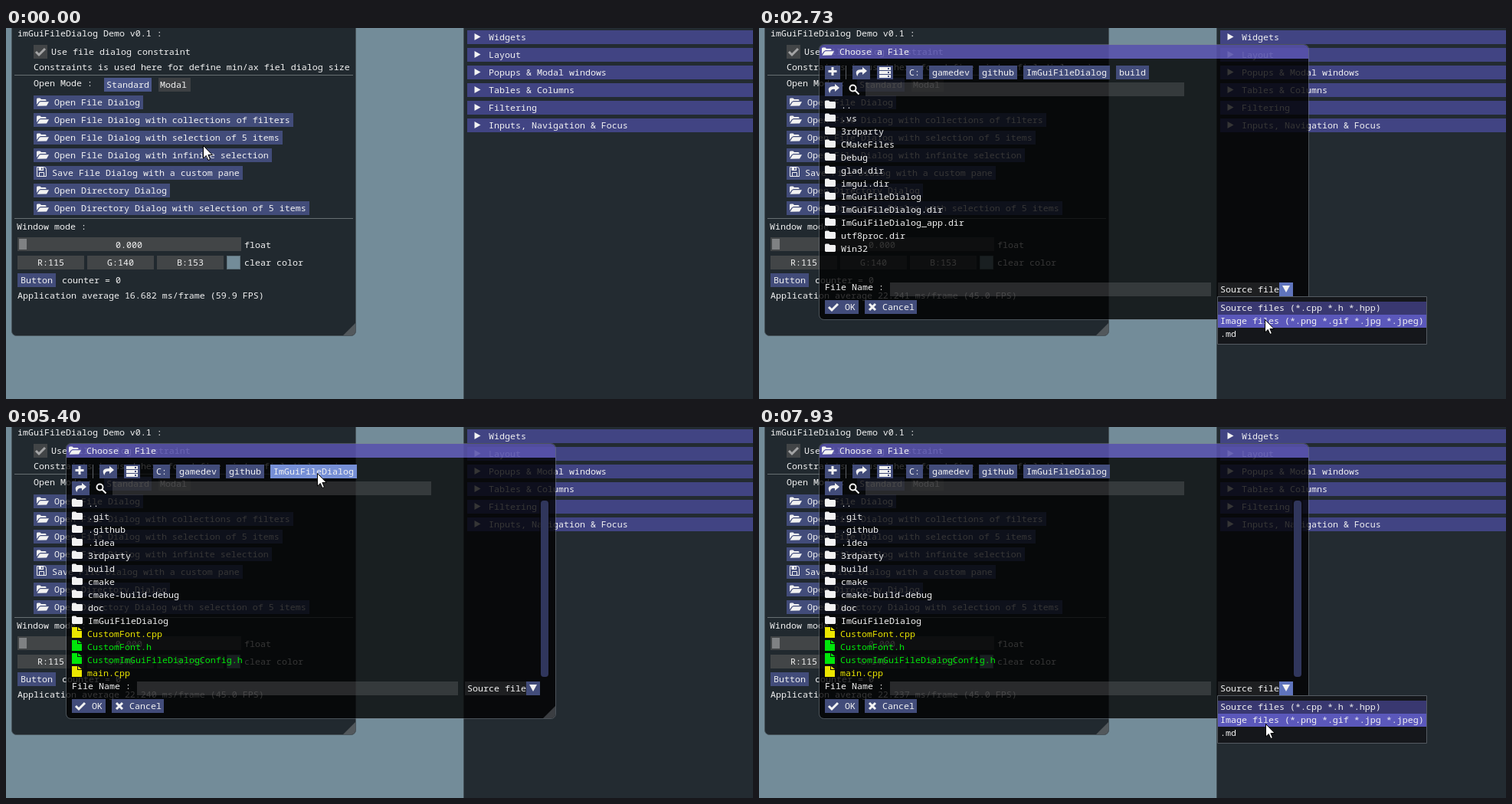
These frames come from a looping animation (975x484 px, 8 s). An HTML page with a canvas:

```html
<!DOCTYPE html>
<html lang="en">
<head>
<meta charset="utf-8">
<title>File dialog demo</title>
<style>
html, body { margin: 0; width: 100%; height: 100%; overflow: hidden; background: #738c99; }
canvas { display: block; }
</style>
</head>
<body>
<canvas id="stage" width="975" height="484"></canvas>
<script>
const ctx = document.getElementById('stage').getContext('2d');
const LOOP = 8000, STEP = 1000 / 15;
const ROW = 23, LINE = 17, CHAR = 7, FRAME_H = 18;
const BUTTON = '#424c7a', HOVER = '#768fd6', TEXT = '#f2f2f2', FRAME = '#424547';
const DARK_FRAME = 'rgba(120,120,122,.3)', SELECT = '#5b58bb', CLEAR = '#738c99';

// stops of the pointer: time, x, y
const STOPS = [
  [0, 257, 153], [500, 414, 130], [1130, 352, 117], [1350, 352, 117], [1867, 639, 333],
  [2900, 662, 383], [3300, 662, 383], [3533, 628, 348], [3700, 645, 342], [4467, 650, 364],
  [4600, 527, 163], [5050, 408, 58], [5560, 406, 60], [6200, 441, 236], [6267, 447, 282],
  [7000, 660, 342], [7860, 661, 387]
];
const ACTIONS = [
  'Open File Dialog', 'Open File Dialog with collections of filters',
  'Open File Dialog with selection of 5 items', 'Open File Dialog with infinite selection',
  'Save File Dialog with a custom pane', 'Open Directory Dialog',
  'Open Directory Dialog with selection of 5 items'
];
const HEADERS = ['Widgets', 'Layout', 'Popups & Modal windows', 'Tables & Columns',
  'Filtering', 'Inputs, Navigation & Focus'];
const BUILD_DIR = ['..', '.vs', '3rdparty', 'CMakeFiles', 'Debug', 'glad.dir', 'imgui.dir',
  'ImGuiFileDialog', 'ImGuiFileDialog.dir', 'ImGuiFileDialog_app.dir', 'utf8proc.dir', 'Win32'];
const ROOT_DIR = ['..', '.git', '.github', '.idea', '3rdparty', 'build', 'cmake',
  'cmake-build-debug', 'doc', 'ImGuiFileDialog', 'CustomFont.cpp', 'CustomFont.h',
  'CustomImGuiFileDialogConfig.h', 'main.cpp'];
const FILTERS = ['Source files (*.cpp *.h *.hpp)', 'Image files (*.png *.gif *.jpg *.jpeg)', '.md'];
const CRUMBS = ['C:', 'gamedev', 'github', 'ImGuiFileDialog', 'build'];

const FILLED = {
  open: 'M0 9V1.5L1 .5H4.5L6 2H11.5L12.5 3V4H5L2.8 5.2ZM.6 10.7L3.6 6L5 5.2H16L13 10.5Z',
  folder: 'M0 1.5L1 .5H5L6.5 2H13L14 3V10L13 11H1L0 10Z',
  file: 'M0 0H7V5H13V14H0ZM8 0L13 4H8Z',
  share: 'M9 0L15 5L9 10V7Q3.5 6 2.4 12Q-3 3 9 3Z',
  down: 'M0 0H10L5 9Z',
  right: 'M0 0L8 4.5L0 9Z',
  arrow: 'M0 0V16.5L3.8 13L6.4 19L9 17.9L6.4 12H11.7Z'
};
const STROKED = {
  check: 'M1 5L5 9L13 1',
  cross: 'M1 1L9 9M9 1L1 9',
  plus: 'M5.5 0V11M0 5.5H11',
  lens: 'M8 4A4 4 0 1 0 0 4A4 4 0 1 0 8 4M7 7L12 12'
};

function icon(name, x, y, color = TEXT, weight = 3) {
  const solid = name in FILLED, path = new Path2D((solid ? FILLED : STROKED)[name]);
  ctx.save();
  ctx.translate(x, y);
  ctx.fillStyle = ctx.strokeStyle = color;
  ctx.lineWidth = weight;
  if (solid) ctx.fill(path); else ctx.stroke(path);
  ctx.restore();
}
function rect(x, y, w, h, color) {
  ctx.fillStyle = color;
  ctx.fillRect(x, y, w, h);
}
// c is the vertical centre of a line of text
function text(s, x, c, color = TEXT) {
  ctx.fillStyle = color;
  ctx.fillText(s, x, c + 4);
}
function frame(x, c, w, color = FRAME) {
  rect(x, c - 9, w, FRAME_H, color);
}
function panel(x, y, w, h, radii, fill, stroke) {
  ctx.beginPath();
  ctx.roundRect(x, y, w, h, radii);
  if (fill) { ctx.fillStyle = fill; ctx.fill(); }
  if (stroke) { ctx.strokeStyle = stroke; ctx.lineWidth = 1; ctx.stroke(); }
}
function grip(x, y, color) {
  ctx.fillStyle = color;
  ctx.beginPath();
  ctx.moveTo(x, y - 16);
  ctx.arcTo(x, y, x - 16, y, 5);
  ctx.lineTo(x - 16, y);
  ctx.fill();
}
const within = (p, x, y, w, h) => p && p[0] >= x && p[0] < x + w && p[1] >= y && p[1] < y + h;

function button(x, c, w, mouse, color = BUTTON) {
  frame(x, c, w, within(mouse, x, c - 9, w, FRAME_H) ? HOVER : color);
}

function pointerAt(t) {
  const next = STOPS.findIndex(s => s[0] > t);
  if (next < 0) return STOPS[STOPS.length - 1].slice(1);
  const [t0, x0, y0] = STOPS[next - 1], [t1, x1, y1] = STOPS[next];
  const u = (t - t0) / (t1 - t0), ease = u * u * (3 - 2 * u);
  return [x0 + (x1 - x0) * ease, y0 + (y1 - y0) * ease];
}

// climbs steadily, then wavers around 22.24
function averageAt(t) {
  const settled = 22.237 + .004 * Math.abs(Math.sin(Math.PI * (t - 4600) / 3333));
  return Math.min(16.682 + t * .002086, settled);
}

function floppy(x, y) {
  panel(x, y, 12, 12, [0, 3, 0, 0], null, TEXT);
  panel(x + 3, y + 7, 6, 5, 0, null, TEXT);
  rect(x + 2, y, 6.5, 4.5, TEXT);
  rect(x + 5.5, y + 1, 1.6, 2.5, BUTTON);
}

function stack(x, y) {
  for (let i = 0; i < 3; i++) {
    rect(x, y + 5 * i, 15, 4, TEXT);
    rect(x + 11, y + 5 * i + 1, 2, 2, BUTTON);
  }
}

function drawMain(t, mouse) {
  panel(7.5, -20.5, 449, 422, 6, '#21292f', '#48545b');
  grip(456, 401, '#52585c');
  text('imGuiFileDialog Demo v0.1 :', 15, 7);
  frame(36, 31, 18);
  icon('check', 38, 26, '#a3a4a5');
  text('Use file dialog constraint', 59, 31);
  text('Constraints is used here for define min/ax fiel dialog size', 36, 51);
  rect(11, 61, 442, 1, '#666e72');
  text('Open Mode :', 36, 72);
  button(128, 74, 62, null, '#4a5689');
  text('Standard', 131, 74);
  button(199, 74, 42, null, '#3d4043');
  text('Modal', 201, 74);
  ACTIONS.forEach((label, i) => {
    const c = 97 + ROW * i, save = label.startsWith('Save'), x = save ? 60 : 63;
    button(36, c, x - 32 + label.length * CHAR, mouse);
    if (save) floppy(40.5, c - 7.5);
    else icon('open', 40, c - 6);
    text(label, x, c);
  });
  rect(11, 248, 442, 1, '#666e72');
  text('Window mode :', 14, 259);
  frame(15, 282, 292);
  rect(17, 275, 10, 14, '#7f8183');
  text('0.000', 143, 283);
  text('float', 311, 283);
  ['R:115', 'G:140', 'B:153'].forEach((label, i) => {
    frame(15 + 91 * i, 306, 87);
    text(label, 41 + 91 * i, 306);
  });
  frame(288, 306, 18, '#5d7079');
  rect(289, 298, 16, 16, CLEAR);
  text('clear color', 311, 306);
  button(15, 329, 50);
  text('Button', 19, 329);
  text('counter = 0', 73, 329);
  const ms = averageAt(t);
  text(`Application average ${ms.toFixed(3)} ms/frame (${(1000 / ms).toFixed(1)} FPS)`, 15, 349);
}

function drawSide() {
  rect(597, 0, 378, 484, '#232b31');
  rect(597, 0, 1, 484, '#414d54');
  HEADERS.forEach((label, i) => {
    const c = 12 + ROW * i;
    frame(602, c, 373, '#414483');
    icon('right', 611.5, c - 5);
    text(label, 630, c);
  });
}

function drawList(inRoot, mouse) {
  const names = inRoot ? ROOT_DIR : BUILD_DIR;
  const first = inRoot ? 100 : 101, width = inRoot ? 610 : 624;
  names.forEach((name, i) => {
    const c = first + LINE * i;
    if (within(mouse, 86, c - 9, width, LINE)) rect(86, c - 9, width, LINE, SELECT);
    const isFile = /\.(cpp|h)$/.test(name);
    const color = !isFile ? TEXT : name.endsWith('.h') ? '#00e60a' : '#ebe600';
    icon(isFile ? 'file' : 'folder', 86, c - (isFile ? 9 : 7), color);
    text(name, isFile ? 106 : 107, c, color);
  });
  if (inRoot) {
    rect(696, 94, 14, 233, 'rgba(8,8,10,.5)');
    panel(698, 96, 10, 230, 4, '#30365c');
  }
}

function drawDialog(inRoot, imageFilter, popup, mouse) {
  panel(79, 22, 638, 18, [6, 6, 0, 0], 'rgba(88,82,172,.88)');
  panel(79, 40, 638, 340, [0, 0, 6, 6], 'rgba(0,0,0,.78)');
  panel(78.5, 21.5, 639, 359, 6, null, 'rgba(125,132,140,.45)');
  grip(717, 380, '#3b3e42');
  icon('open', 82, 25);
  text('Choose a File', 105, 31);

  button(86, 58, 20, mouse);
  icon('plus', 90.5, 51);
  rect(113, 49, 1, FRAME_H, '#5b5f66');
  button(122, 58, 23, mouse);
  icon('share', 126, 51);
  button(154, 58, 21, mouse);
  stack(157, 51);
  let x = 192;
  for (const name of CRUMBS.slice(0, inRoot ? 4 : 5)) {
    const w = name.length * CHAR + 8;
    button(x, 58, w, mouse);
    text(name, x + 4, 58);
    x += w + 8;
  }
  button(86, 80, 23, mouse);
  icon('share', 90, 73);
  icon('lens', 118.5, 74.5, TEXT, 2);
  frame(139, 80, 416, DARK_FRAME);

  drawList(inRoot, mouse);

  text('File Name :', 86, 338);
  frame(171, 341, 419, DARK_FRAME);
  frame(599, 341, 80, 'rgba(120,120,122,.2)');
  text(FILTERS[imageFilter ? 1 : 0].slice(0, 11), 602, 341);
  const lit = popup || within(mouse, 599, 332, 98, FRAME_H);
  frame(679, 341, 18, lit ? '#5f74bd' : BUTTON);
  icon('down', 683, 336);
  button(86, 364, 44, mouse);
  icon('check', 90, 359);
  text('OK', 112, 364);
  button(138, 364, 68, mouse);
  icon('cross', 143, 359);
  text('Cancel', 161, 364);
}

function drawPopup(selected, mouse) {
  panel(598.5, 350.5, 273, 62, 0, '#15171b', '#555b62');
  FILTERS.forEach((label, i) => {
    const c = 365 + LINE * i, over = within(mouse, 599, c - 8, 272, LINE);
    if (over || i === selected) rect(599, c - 8, 272, LINE, over ? SELECT : '#393870');
    text(label, 602, c);
  });
}

function drawPointer([x, y]) {
  x = Math.round(x) + .5;
  y = Math.round(y) + .5;
  icon('arrow', x, y, '#fff');
  ctx.save();
  ctx.translate(x, y);
  ctx.lineWidth = 1;
  ctx.strokeStyle = '#000';
  ctx.stroke(new Path2D(FILLED.arrow));
  ctx.restore();
}

function draw(t) {
  const between = (a, b) => t > a && t < b;
  const isOpen = t > 1320, inRoot = t > 5390;
  const imageFilter = between(3330, 4460);
  const popup = between(2060, 3330) || between(3730, 4460) || t > 7130;
  // hover trails the pointer by one step
  const mouse = pointerAt(Math.max(0, t - STEP));
  ctx.font = '11.667px "Noto Sans Mono", "DejaVu Sans Mono", monospace';
  rect(0, 0, 975, 484, CLEAR);
  drawMain(t, isOpen ? null : mouse);
  drawSide();
  if (isOpen) drawDialog(inRoot, imageFilter, popup, popup ? null : mouse);
  if (popup) drawPopup(imageFilter ? 1 : 0, mouse);
  drawPointer(pointerAt(t));
}

function tick(now) {
  draw(Math.floor((now % LOOP + 4) / STEP) % 120 * STEP);
  requestAnimationFrame(tick);
}
tick(performance.now());
</script>
</body>
</html>
```
